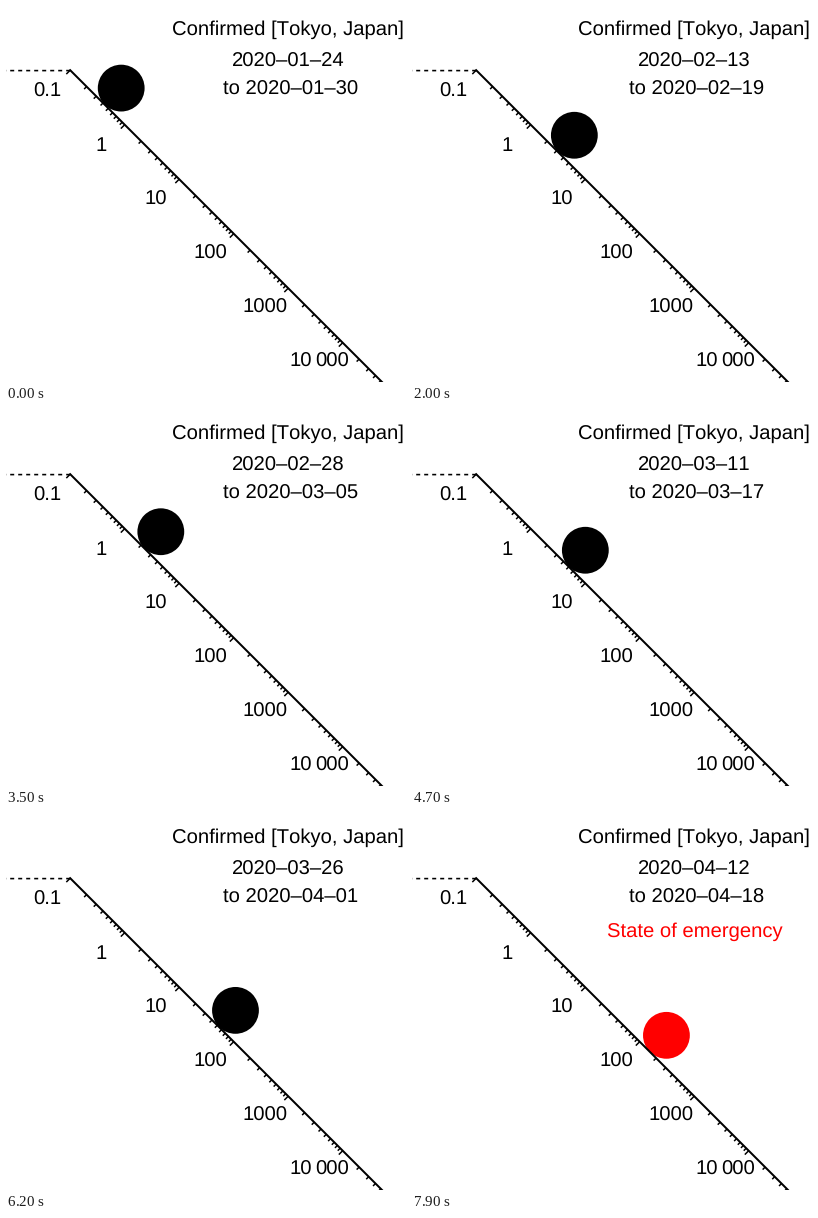
A matplotlib script for the animation above (8 s loop, 400 by 376 pixels).

```python
import matplotlib.pyplot as plt
import numpy as np
from matplotlib.animation import FuncAnimation
from matplotlib.patches import Circle

W, H, DPI = 400, 376, 80
PX = 72 / DPI          # points per pixel
X0 = 64.2              # where the slope starts, at value 0.1
DECADE = 54.5          # pixels per decade along each axis
R = 23.4
MID = 282.4            # centre of the headings
DAYS, WINDOW = 80, 7
START = np.datetime64("2020-01-24")
EMERGENCY = np.datetime64("2020-04-07")

plt.rcParams.update({
    "font.family": "Liberation Sans",
    "font.size": 20.2 * PX,
    "text.hinting": "none",
    "text.kerning_factor": 10,   # effectively no kerning
})

# Daily confirmed cases, starting on START
CASES = np.array(
    [1, 1, 0, 0, 0, 0, 1] + [0] * 13
    + [1, 2, 8, 5, 0, 3, 3, 0, 3, 1, 0, 3, 0, 3, 1, 0, 1]
    + [2, 0, 1, 4, 8, 6, 6, 0, 0, 3, 6, 2, 2, 10, 3, 0,
       12, 9, 7, 11, 7, 2, 16, 17, 41, 47, 40, 63, 68, 13, 78]
    + [66, 97, 89, 116, 143, 83, 79, 144, 178, 189, 197, 166,
       91, 161, 127, 149, 201, 181])
MEAN = np.convolve(CASES, np.ones(WINDOW), "valid") / WINDOW

fig = plt.figure(figsize=(W / DPI, H / DPI), dpi=DPI, facecolor="white")
ax = fig.add_axes([0, 0, 1, 1])
ax.set(xlim=(0, W), ylim=(H, 0))
ax.axis("off")


def line(xs, ys, width, **kw):
    ax.plot(xs, ys, color="black", lw=width * PX, snap=False, **kw)


def label(x, y, s, **kw):
    return ax.text(x, y, s, ha="center", va="baseline", **kw)


def along(value):
    """Offset in pixels of a value on the slope."""
    return DECADE * (np.log10(value) + 1)


def tick(value, length):
    p, d = X0 + along(value), length / np.sqrt(2)
    line([p, p - d], [p, p + d], 1.5, solid_capstyle="butt")


def ball_center(mean):
    if mean < 1e-9:
        return X0 - R, X0 - R
    p, d = X0 + along(mean), R / np.sqrt(2)
    return p + d, p - d


line([X0, 0], [64.6, 64.6], 1.6, dashes=(2.5, 2.5), dash_capstyle="butt")
line([X0, W], [X0, W], 2)
for k in range(-1, 5):
    tick(10.0 ** k, 5.5)
    for m in range(2, 10):
        tick(m * 10.0 ** k, 3.5)

for k, name in enumerate(["0.1", "1", "10", "100", "1000"]):
    label(41 + 54.4 * k, 91 + 54 * k, name)
label(294.9, 361, "10")
label(325.9, 361, "000")

label(MID, 29, "Confirmed [Tokyo, Japan]")
first = label(MID, 61, "")
last = label(MID + 2.6, 89, "")
alert = label(MID, 123, "State of emergency", color="red")
ball = ax.add_patch(Circle((0, 0), R, lw=0))


def iso(day):
    return str(day).replace("-", "\u2013")


def update(i):
    day = START + i
    first.set_text(iso(day))
    last.set_text("to " + iso(day + WINDOW - 1))
    urgent = bool(day >= EMERGENCY)
    alert.set_visible(urgent)
    ball.set_facecolor("red" if urgent else "black")
    ball.center = ball_center(MEAN[i])
    return first, last, alert, ball


anim = FuncAnimation(fig, update, frames=DAYS, interval=100,
                     repeat=True, repeat_delay=0)
plt.show()
```
